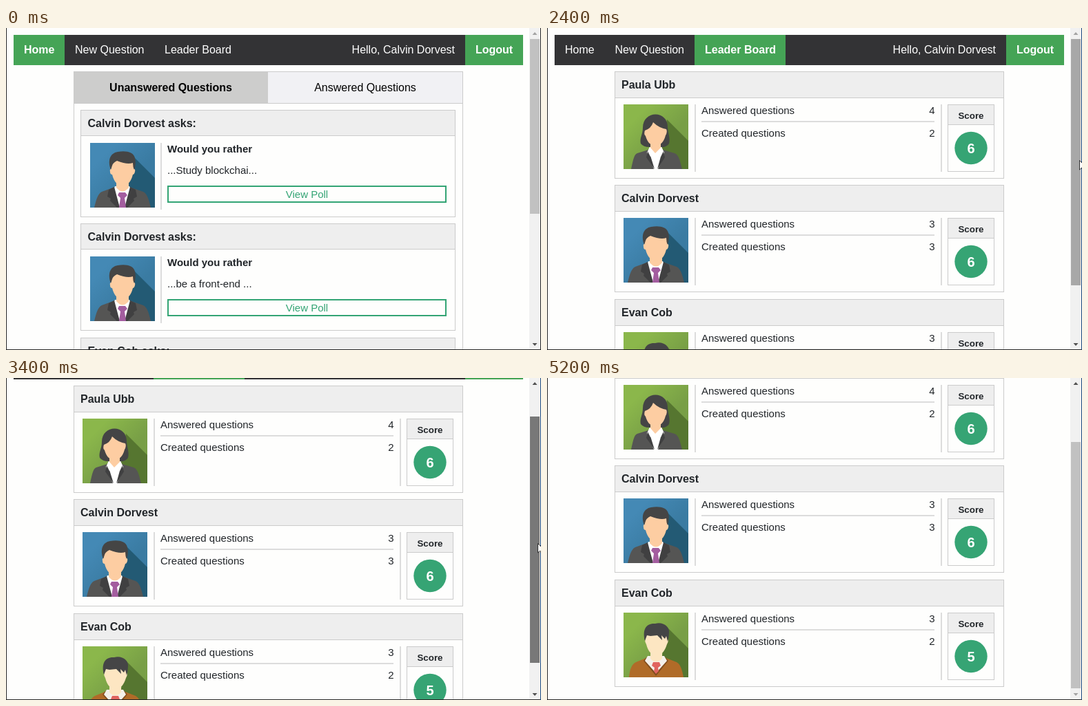
Animation, 776 px wide and 468 px high, one loop 6.2 s. Source, as an HTML page:

```html
<!DOCTYPE html>
<html lang="en">
<head>
<meta charset="utf-8">
<title>Poll leader board</title>
<style>
  html, body { margin: 0; width: 100%; height: 100%; overflow: hidden; background: #fefefd; }
  svg { display: block; width: 776px; height: 468px; }
  text { font: 15px "Liberation Sans", Arial, sans-serif; fill: #212529; }
  .big { font-size: 16px; }
  .bold { font-weight: bold; }
  .small { font-size: 13.33px; }
  .score { font-size: 20px; }
  .white { fill: #fff; }
  .black { fill: #000; }
  .green { fill: #33a474; }
  .mid { text-anchor: middle; }
  .end { text-anchor: end; }
</style>
</head>
<body>
<svg viewBox="0 0 776 468">
  <defs>
    <linearGradient id="blue" x2="1" y2="1">
      <stop offset=".2" stop-color="#4489b5"/><stop offset=".6" stop-color="#3a7ba2"/>
    </linearGradient>
    <linearGradient id="lime" x2="1" y2="1">
      <stop offset=".2" stop-color="#8bb74b"/><stop offset=".6" stop-color="#789f46"/>
    </linearGradient>

    <symbol id="man" viewBox="0 0 94 94">
      <path fill="url(#blue)" d="M0 0H94V94H0Z"/>
      <path fill="#235a74" d="M62 19L94 51V94H50Z"/>
      <path fill="#555554" d="M6 94C9 82 11 74 17 71L36 64H57L77 71C83 74 85 82 88 94Z"/>
      <path fill="#fff" d="M36 63L33 70L42 94H52L60 70L57 63Z"/>
      <path fill="#404041" d="M35 64L27 68L25 78L30 81L29 84L39 94H43ZM58 64L66 68L68 78L63 81L64 84L54 94H50Z"/>
      <path fill="#fdcda2" d="M38 52H56V65Q47 76 38 65Z"/>
      <path fill="#a35d9f" d="M42 72H51L54 76L50 80L52 94H42L44 80L40 76Z"/>
      <path fill="#fdcda2" d="M31 24H63V37Q66 38 65 42Q64 46 62 46Q58 62 47 62Q36 62 32 46Q29 46 29 42Q28 38 31 37Z"/>
      <path fill="#454545" d="M30 39C25 25 29 15 40 13C52 11 63 13 65 22Q67 30 64 39Q62 35 62 29Q54 32 39 26Q33 29 32 33Z"/>
    </symbol>

    <symbol id="woman" viewBox="0 0 94 94">
      <path fill="url(#lime)" d="M0 0H94V94H0Z"/>
      <path fill="#567630" d="M63 22L94 53V94H50Z"/>
      <path fill="#444445" d="M28 34C28 8 65 8 64 34C65 44 68 49 66 57Q62 63 54 62H37Q29 62 25 57C23 49 28 44 28 34Z"/>
      <path fill="#555554" d="M11 94C14 81 15 73 20 71L36 66H57L74 71C80 73 82 82 85 94Z"/>
      <path fill="#fff" d="M38 62L34 70L44 94H50L59 70L55 62Z"/>
      <path fill="#404041" d="M36 65L33 77L45 94ZM57 65L60 77L49 94Z"/>
      <path fill="#fff" d="M38 62L35 68L39 76L46 70L54 76L58 68L55 62Z"/>
      <path fill="#fdcda2" d="M39 54H54V63L46 71L39 63Z"/>
      <path fill="#fdcda2" d="M31 38Q40 35 43 26Q51 34 62 36Q64 40 61 45Q57 60 46 60Q36 60 32 46Q29 43 31 38Z"/>
    </symbol>

    <symbol id="youth" viewBox="0 0 94 94">
      <path fill="url(#lime)" d="M0 0H94V94H0Z"/>
      <path fill="#567630" d="M64 22L94 52V94H50Z"/>
      <path fill="#b06b28" d="M8 94C9 82 12 75 18 72L35 65H59L77 72C83 75 85 84 87 94Z"/>
      <path fill="#824d1d" d="M33 65L29 70L47 92L65 70L61 65L47 84Z"/>
      <path fill="#f4f0ea" d="M35 63L31 70L47 88L63 70L59 63Z"/>
      <path fill="#fde6c2" d="M39 54H56V67Q47 76 39 67Z"/>
      <path fill="#e1645f" d="M43 72H52L54 77L50 80L51 85L47 89L44 85L45 80L41 77Z"/>
      <path fill="#fde6c2" d="M32 28H64V38Q66 41 63 46Q58 62 48 62Q37 62 33 46Q30 41 32 38Z"/>
      <path fill="#454546" d="M31 41C27 24 33 15 46 16C58 13 67 21 66 29Q66 36 64 42L62 34L60 38L55 33L56 40L49 33L39 34L34 33Z"/>
    </symbol>
  </defs>

  <rect width="776" height="468" fill="#fefefd"/>
  <g id="home"></g>
  <g id="board"></g>
  <g id="bar">
    <path fill="#f1f1f1" d="M759 0H775V468H759Z"/>
    <path id="up" d="M763.5 10L767 6L770.5 10Z"/>
    <path id="down" d="M763.5 458L767 462L770.5 458Z"/>
    <rect id="thumb" x="760" y="16" width="14" height="254"/>
  </g>
  <path fill="#262626" d="M0 0H1V468H0ZM0 467H776V468H0Z"/>
  <rect id="edge" x="775" width="1" height="468"/>
  <g id="cursor">
    <path id="arrow" fill="#fff" stroke="#222" stroke-width=".9" d="M.5 .5V14L3.7 11L6 16L8 15L6 10.3H10.3Z"/>
    <path id="hand" fill="#fff" stroke="#222" stroke-width=".9"
      d="M-1.3 1.5Q0 -.5 1.3 1.5V7Q3 5.6 4 7.4Q5.6 6.4 6.5 8Q8.5 7.6 8.5 10V13Q8 15 7 18H-.5Q-2 15 -4.5 11.5Q-4.5 9.4 -2.6 10.4L-1.3 11.8Z"/>
  </g>
</svg>
<script>
const LOOP = 6200;
const GREEN = '#45a456', TEAL = '#36a474', LINE = '#cbcbcb', RULE = '#dcdcdc', HEAD = '#eeeeee';
const ME = 'Calvin Dorvest';
const $ = id => document.getElementById(id);

const box = (x, y, w, h, fill, stroke = 'none', sw = 1) =>
  `<rect x="${x}" y="${y}" width="${w}" height="${h}" fill="${fill}" stroke="${stroke}" stroke-width="${sw}"/>`;
const text = (x, y, s, cls = '') => `<text x="${x}" y="${y}" class="${cls}">${s}</text>`;
const face = (id, x, y) => `<use href="#${id}" x="${x}" y="${y}" width="94" height="94"/>`;
const row = (i, body) => `<g transform="translate(0 ${Math.round(i * 165.4)})">${body}</g>`;

function nav(items) {
  return box(11, 10, 739, 44, '#333335') + items.map(([x, w, label, on]) =>
    (on ? box(x, 10, w, 44, GREEN) : '') +
    text(x + 15, 37, label, 'big white' + (on ? ' bold' : ''))).join('') +
    text(651, 37, 'Hello, ' + ME, 'big white end') +
    box(666, 10, 84, 44, GREEN) + text(681, 37, 'Logout', 'big bold white');
}

function pollCard(name, pic, option, i) {
  return row(i,
    box(108.5, 119.5, 543, 155, '#fefefd', LINE) +
    box(108.5, 119.5, 543, 37, HEAD, LINE) +
    text(118.5, 144, name + ' asks:', 'big bold') +
    face(pic, 122, 167) + box(224, 167, 2, 97, RULE) +
    text(234, 181, 'Would you rather', 'bold') + text(234, 212, option) +
    box(235, 230, 403, 23, 'none', '#33a474', 2) +
    text(436.5, 246.5, 'View Poll', 'green mid'));
}

function scoreCard(name, pic, answered, created, i) {
  return row(i,
    box(98.5, 63.5, 564, 155, '#fefefd', LINE) +
    box(98.5, 63.5, 564, 38, HEAD, LINE) +
    text(108, 88, name, 'big bold') +
    face(pic, 111, 111) + box(214, 111, 2, 98, RULE) +
    text(224, 125, 'Answered questions') + text(562.5, 125, answered, 'end') +
    box(224, 135, 338, 2, RULE) +
    text(224, 158, 'Created questions') + text(562.5, 158, created, 'end') +
    box(571, 111, 2, 98, RULE) +
    box(581.5, 111.5, 67, 97, '#fefefd', LINE) +
    box(581.5, 111.5, 67, 29, HEAD, LINE) +
    text(615, 131.5, 'Score', 'small bold mid') +
    `<circle cx="615" cy="174.5" r="23.7" fill="${TEAL}"/>` +
    text(615, 181.5, answered + created, 'score bold white mid'));
}

$('home').innerHTML =
  nav([[11, 74, 'Home', true], [85, 130, 'New Question'], [215, 127, 'Leader Board']]) +
  `<g id="hover">${box(215, 10, 127, 44, '#dddddd') + text(230, 37, 'Leader Board', 'big black')}</g>` +
  box(98.5, 63.5, 564, 500, '#fefefd', LINE) +
  box(99, 64, 281, 45, '#cdcdcc') + box(380, 64, 282, 45, '#f1f1f4') + box(98, 109, 565, 1, LINE) +
  text(239, 92, 'Unanswered Questions', 'big bold black mid') +
  text(521, 92, 'Answered Questions', 'big black mid') +
  pollCard(ME, 'man', '...Study blockchai...', 0) +
  pollCard(ME, 'man', '...be a front-end ...', 1) +
  pollCard('Evan Cob', 'youth', '', 2);

$('board').innerHTML =
  nav([[11, 72, 'Home'], [83.5, 130, 'New Question'], [214, 132, 'Leader Board', true]]) +
  scoreCard('Paula Ubb', 'woman', 4, 2, 0) +
  scoreCard(ME, 'man', 3, 3, 1) +
  scoreCard('Evan Cob', 'youth', 3, 2, 2);

// Holds each value from its time (ms) until the next one.
function hold(id, prop, steps) {
  const frames = steps.map(([t, v]) => ({ offset: t / LOOP, [prop]: v, easing: 'step-end' }));
  frames.push({ offset: 1, [prop]: steps[steps.length - 1][1] });
  $(id).animate(frames, { duration: LOOP, iterations: Infinity });
}
const move = (x, y) => `translate(${x}px, ${y}px)`;

hold('hover', 'opacity', [[0, 0], [800, 1]]);
hold('home', 'opacity', [[0, 1], [1400, 0]]);
hold('board', 'opacity', [[0, 0], [1400, 1]]);

const scroll = [[0, 0], [3200, 29], [3400, 52], [3600, 76], [3800, 92], [4000, 101]];
hold('board', 'transform', scroll.map(([t, y]) => [t, move(0, -y)]));
hold('thumb', 'transform', scroll.map(([t, y]) => [t, move(0, Math.round(y * 0.765))]));
hold('thumb', 'height', [[0, '254px'], [1400, '358px']]);
hold('thumb', 'fill', [[0, '#c1c1c1'], [2400, '#a8a8a8'], [3000, '#787878'], [5000, '#a8a8a8'], [5200, '#c1c1c1']]);
hold('up', 'fill', [[0, '#a3a3a3'], [3200, '#505050']]);
hold('down', 'fill', [[0, '#505050'], [4000, '#a3a3a3']]);
hold('edge', 'fill', [[0, '#262626'], [1400, '#1c4a80']]);

hold('cursor', 'opacity', [[0, 0], [200, 1], [3800, 0]]);
hold('hand', 'opacity', [[0, 0], [800, 1], [2000, 0]]);
hold('arrow', 'opacity', [[0, 1], [800, 0], [2000, 1]]);
hold('cursor', 'transform', [
  [0, 347, 173], [200, 347, 173], [400, 212, 135], [600, 240, 30], [800, 284, 20],
  [1600, 285, 25], [2000, 724, 170], [2200, 768, 190], [2400, 772, 192], [2800, 768, 192],
  [3000, 768, 202], [3200, 769, 224], [3400, 771, 240], [3600, 773, 255]
].map(([t, x, y]) => [t, move(x, y)]));
</script>
</body>
</html>
```
